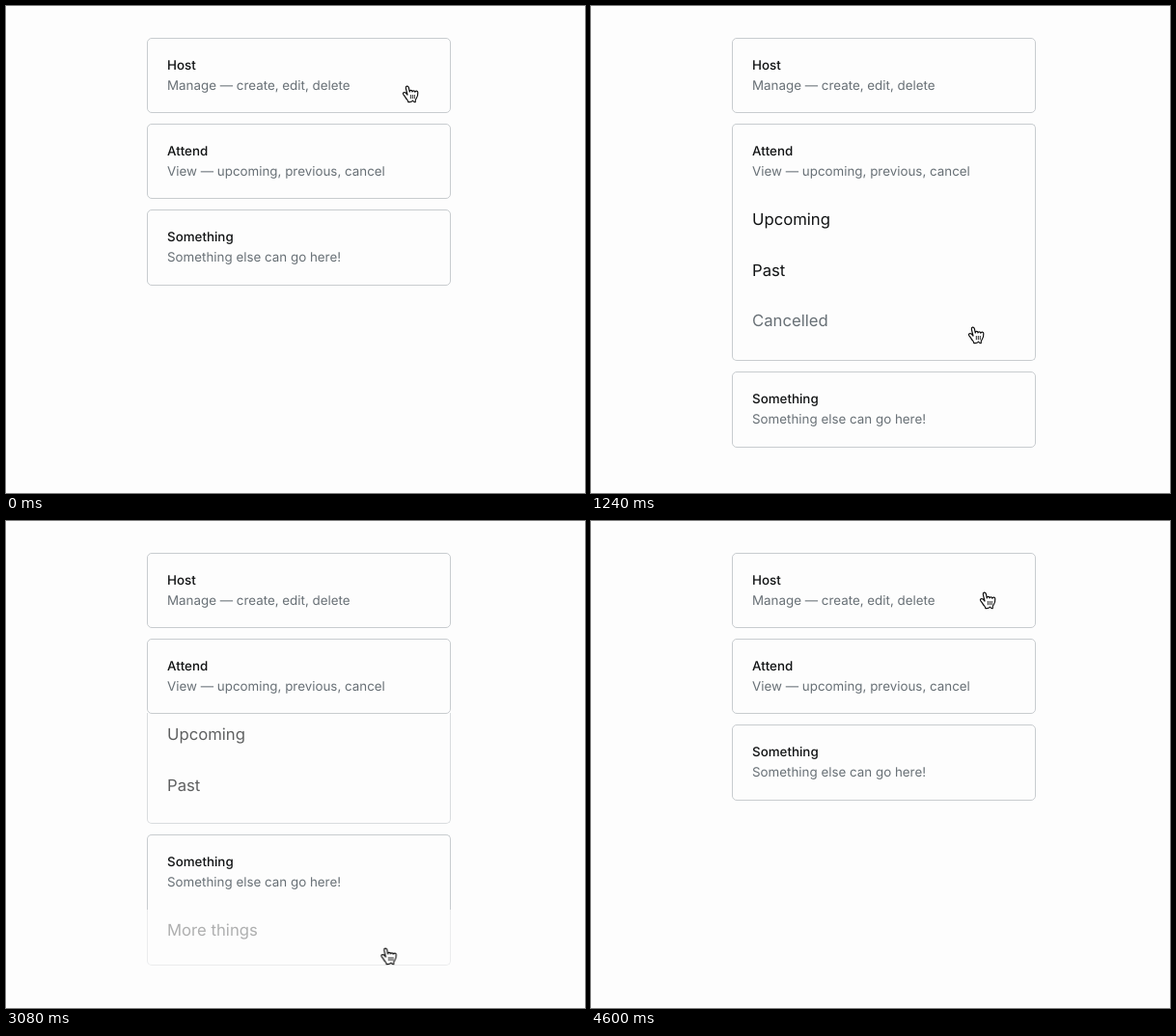
Write an HTML page that moves like this. It is 600 px wide and 505 px high and loops after 5040 ms.

```html
<!DOCTYPE html>
<html lang="en">
<head>
<meta charset="utf-8">
<title>Accordion</title>
<style>
  :root { --ink: #111314; --muted: #687076; --line: #c8cccf; --loop: 5040ms; }
  html, body { margin: 0; width: 100%; height: 100%; overflow: hidden; background: #fdfdfd; }
  body {
    position: relative; color: var(--ink);
    font-family: Inter, sans-serif; text-rendering: geometricPrecision;
  }

  .list { position: absolute; left: 146px; top: 32.6px; width: 315px; }
  .card { margin-bottom: 11.15px; }
  .head, .body { box-sizing: border-box; border: 1px solid var(--line); }

  .head {
    position: relative; height: 78.25px; border-radius: 5px;
    animation: var(--loop) step-end infinite;
  }
  .head b, .head span {
    position: absolute; left: 20px; top: 18px;
    font-size: 13.36px; line-height: 20px; font-weight: 500; white-space: nowrap;
  }
  .head span { top: 39px; font-weight: 400; color: var(--muted); }

  .body {
    height: 1px; margin-top: -1px; opacity: 0; overflow: hidden;
    border-top: 0; border-radius: 0 0 5px 5px;
    animation: var(--loop) ease infinite;
  }
  ul { position: relative; top: -2.8px; margin: 0; padding: 0 0 0 20px; list-style: none; }
  li { position: relative; height: 52.5px; font-size: 16.7px; line-height: 52.5px; white-space: nowrap; }
  .current { padding-left: 10.6px; }
  .current::before {
    content: ""; position: absolute; left: .3px; top: 23.5px;
    width: 5.5px; height: 5.5px; border-radius: 50%; background: currentColor;
  }

  .host .head { animation-name: host-edge; }
  .host .body { animation-name: host-body; }
  .attend .head { animation-name: attend-edge; }
  .attend .body { animation-name: attend-body; }
  .other .head { animation-name: other-edge; }
  .other .body { animation-name: other-body; }
  .attend li:last-child { animation: attend-hover var(--loop) linear infinite; }
  .other li:last-child { animation: other-hover var(--loop) linear infinite; }

  /* The head loses its lower edge for as long as its card is the open one. */
  @keyframes host-edge {
    0%, 16.07%, 84.72%, 100% { border-bottom-width: 1px; border-radius: 5px; }
    .6%, 70.83% { border-bottom-width: 0; border-radius: 5px 5px 0 0; }
  }
  @keyframes attend-edge {
    0%, 31.35%, 59.85%, 100% { border-bottom-width: 1px; border-radius: 5px; }
    16.07%, 43.06% { border-bottom-width: 0; border-radius: 5px 5px 0 0; }
  }
  @keyframes other-edge {
    0%, 43.06%, 70.83%, 100% { border-bottom-width: 1px; border-radius: 5px; }
    31.35%, 59.85% { border-bottom-width: 0; border-radius: 5px 5px 0 0; }
  }

  /* Closed, just mounted, fully open. */
  @keyframes host-body {
    0%, .59%, 22.03%, 70.82%, 90.68%, 100% { height: 1px; opacity: 0; }
    .6%, 22.02%, 70.83%, 90.67% { height: 4px; opacity: 0; }
    6.55%, 16.07%, 76.79%, 84.72% { height: 169px; opacity: 1; }
  }
  @keyframes attend-body {
    0%, 16.06%, 37.31%, 43.05%, 65.81%, 100% { height: 1px; opacity: 0; }
    16.07%, 37.3%, 43.06%, 65.8% { height: 4px; opacity: 0; }
    22.02%, 31.35%, 49.01%, 59.85% { height: 169px; opacity: 1; }
  }
  @keyframes other-body {
    0%, 31.34%, 49.02%, 59.84%, 76.8%, 100% { height: 1px; opacity: 0; }
    31.35%, 49.01%, 59.85%, 76.79% { height: 4px; opacity: 0; }
    37.3%, 43.06%, 65.8%, 70.83% { height: 169px; opacity: 1; }
  }

  @keyframes attend-hover {
    0%, 23.21%, 29.17%, 100% { color: var(--ink); }
    24.6%, 27.78% { color: var(--muted); }
  }
  @keyframes other-hover {
    0%, 34.92%, 40.48%, 100% { color: var(--ink); }
    36.31%, 39.09% { color: var(--muted); }
  }

  .hand {
    position: absolute; left: -16.4px; top: -16px; width: 32px; height: 32px;
    animation: point var(--loop) ease-in-out infinite;
  }
  @keyframes point {
    0%, .6% { transform: translate(419px, 91px); }
    4% { transform: translate(419px, 88px); }
    9.52% { transform: translate(419px, 113px); }
    11.11%, 11.9% { transform: translate(419px, 117px); }
    16%, 27.6% { transform: translate(399px, 341px); }
    31.2% { transform: translate(403px, 420px); }
    37.5% { transform: translate(403px, 420px); animation-timing-function: ease-in; }
    38.89% { transform: translate(403px, 317px); animation-timing-function: ease-out; }
    41.7% { transform: translate(401px, 160px); }
    43% { transform: translate(401px, 155px); }
    49.2% { transform: translate(401px, 172px); }
    50% { transform: translate(401px, 173px); }
    59.52%, 66% { transform: translate(396.5px, 451px); }
    71%, 82.54% { transform: translate(411px, 105px); }
    84.5% { transform: translate(411px, 66px); }
    91.2%, 100% { transform: translate(411px, 82px); }
  }
</style>
</head>
<body>
  <div class="list">
    <section class="card host">
      <div class="head"><b>Host</b><span>Manage — create, edit, delete</span></div>
      <div class="body"><ul><li class="current">Upcoming</li><li>Past</li><li>Cancelled</li></ul></div>
    </section>
    <section class="card attend">
      <div class="head"><b>Attend</b><span>View — upcoming, previous, cancel</span></div>
      <div class="body"><ul><li>Upcoming</li><li>Past</li><li>Cancelled</li></ul></div>
    </section>
    <section class="card other">
      <div class="head"><b>Something</b><span>Something else can go here!</span></div>
      <div class="body"><ul><li>More things</li><li>can go</li><li>in here!</li></ul></div>
    </section>
  </div>
  <svg class="hand" viewBox="0 0 32 32" stroke="#111" stroke-width="1.2" stroke-linecap="round" stroke-linejoin="round">
    <path fill="#fff" d="M11.3 20.4C10.5 19 9.3 17.5 8.6 16.5C8 15.2 9.5 13.8 11.3 15.1L13 17L11.4 10.6
      C10.8 7.7 13.6 7.3 14.4 9.8L15.3 14C15.3 11.8 17.9 11.7 18 14C18.3 12.3 20.5 12.4 20.8 14.2
      C21.4 12.6 23.8 12.7 23.8 14.8C23.9 18 23.6 19.2 22.3 20.7C21.2 21.9 21 22.8 21.2 24.6
      C19.8 24.9 19.3 24.2 18.9 23.5C18.6 23 18.4 23 18.1 23.5C17.3 24.8 16.3 24.6 13.8 24.6
      C14 23 12.2 22 11.3 20.4Z"/>
    <path fill="none" stroke-width=".9" d="M16.3 17.4v3.4M18.3 17.4v3.4M20.3 17.4v3.4"/>
  </svg>
</body>
</html>
```
